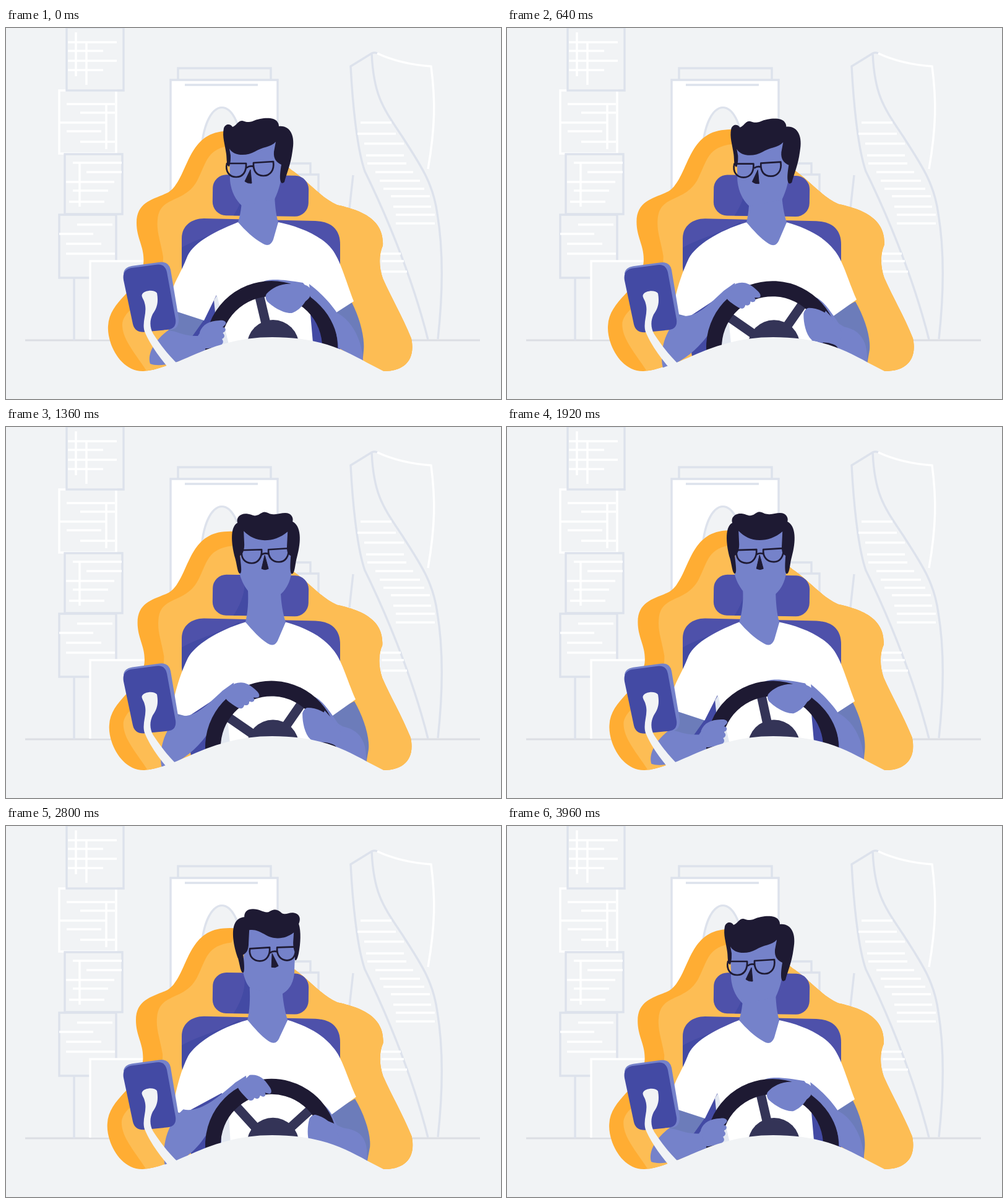
These frames come from a looping animation (800x600 px, 4 s). An HTML page:

```html
<!DOCTYPE html>
<html lang="en">
<head>
<meta charset="utf-8">
<title>Driver</title>
<style>
html, body { margin: 0; width: 100%; height: 100%; overflow: hidden; background: #f1f3f5; }
svg { display: block; width: 800px; height: 600px; }
.line { fill: none; stroke: #dde2ec; stroke-width: 3.4; }
.white { fill: none; stroke: #fff; stroke-width: 3.4; }
.skin { fill: #7582ca; }
.shade { fill: #6c7cba; }
.ink { fill: #1e1a33; }
.navy { fill: #434aa4; }
.violet { fill: #4e51aa; }
.paper { fill: #f1f3f5; }
</style>
</head>
<body>
<svg viewBox="0 0 800 600">
  <defs>
    <clipPath id="blobClip"><use href="#blob"/></clipPath>
    <clipPath id="restClip"><rect x="334" y="238" width="155" height="66" rx="22"/></clipPath>
  </defs>

  <g id="city">
    <path class="line" d="M31 505H766" style="stroke:#dcdee3;stroke-width:3"/>
    <path class="white" d="M86 101H178V203H86Z"/>
    <path class="line" d="M98 -1H190V101H98ZM95 204H188V301H95ZM86 302H178V404H86ZM110 404V505"/>
    <path class="white" d="M136 504V377H240V504" style="fill:#f1f3f5"/>
    <path class="line" d="M278 84V65H428V84M439 219H492V237H505V300M492 237H470"/>
    <path class="line" d="M266 84H439V500H266Z" style="fill:#fff"/>
    <path class="line" d="M289 92H407"/>
    <path class="line" d="M316 195C323 108 374 105 382 195" style="fill:#f1f3f5"/>
    <path class="line" d="M600 41C596 39 593 40 591 41L557 62C560 120 567 195 580 232C606 285 654 392 682 504M591 41C594 110 610 130 640 175C670 222 690 250 697 300C707 360 706 430 698 503M561 238L555 292"/>
    <path class="white" d="M600 41C630 55 660 60 687 62C694 115 694 160 682 228"/>
  </g>

  <g id="cushion">
    <path id="blob" fill="#ffad33" d="M222 555C185 556 163 510 165 482C167 440 215 425 222 382C225 355 211 342 211 315C211 280 240 277 262 266C295 245 290 172 352 167C410 160 440 215 465 232C490 250 510 275 535 286C565 293 612 305 609 352C603 365 602 385 609 405C622 435 640 465 655 502C663 540 640 555 612 555C595 554 585 540 570 535L275 540C255 548 240 554 222 555Z"/>
    <path clip-path="url(#blobClip)" fill="#fdbd54" d="M228 556C212 530 188 505 188 480C190 445 255 440 254 370C250 345 243 330 245 310C248 270 290 285 310 245C325 215 325 195 365 190L400 100H700V600H228Z"/>
  </g>

  <g id="car">
    <path class="violet" d="M284 385V340C284 320 300 308 320 308L500 312C525 313 540 325 540 350V520L500 540H300Z"/>
    <path class="navy" d="M284 355C310 340 350 330 376 314L520 440V540H300L284 385Z"/>
    <g transform="rotate(.8 411 271)">
      <rect class="violet" x="334" y="238" width="155" height="66" rx="22"/>
      <path class="navy" clip-path="url(#restClip)" d="M384 238C389 262 380 285 368 304H430V238Z"/>
    </g>
    <path id="upperL" class="shade"/>
    <path id="upperR" class="shade"/>
    <path id="shirt" fill="#fff"/>
    <path id="fold" fill="#e3e8f1"/>
    <path id="neck" class="skin"/>
    <g id="head">
      <path id="face" class="skin"/>
      <path id="hair" class="ink"/>
      <path id="glasses" fill="none" stroke="#1e1a33" stroke-width="2.7" stroke-linejoin="round"/>
      <path id="nose" class="ink" stroke="#1e1a33" stroke-linejoin="round"/>
    </g>
    <path id="armL" class="skin"/>
    <g class="turn">
      <path class="skin" d="M414 411C425 404 450 407 480 412L490 425L440 425Z"/>
      <path d="M409 431L429 516L344 536" fill="none" stroke="#343457" stroke-width="15"/>
      <circle cx="429" cy="516" r="94.5" fill="none" stroke="#1e1a33" stroke-width="25"/>
    </g>
    <circle cx="431.500" cy="514" r="42" fill="#343457"/>
    <path id="armR" class="skin"/>
    <g class="turn skin">
      <path d="M313 492C318 479 328 474 345 473C353 472 358 476 354 480L350 484C356 484 356 490 352 492L350 493C355 497 353 501 349 503C353 508 350 512 345 514C330 518 325 519 320 518Z"/>
      <path d="M421 430C430 420 445 412 465 414C478 413 488 415 492 422C496 430 490 438 484 442C478 452 470 458 462 461C448 462 430 450 422 442C419 437 419 433 421 430Z"/>
    </g>
  </g>

  <g id="phone">
    <path class="skin" d="M190 396Q191 386 204 384L248 378Q263 376 266 390L279 468Q280 485 268 487L250 485L200 410Z"/>
    <path class="navy" d="M205 387L243 382Q257 380 260 394L274 470Q276 485 262 487L222 491Q208 491 205 478L190 407Q187 389 205 387Z"/>
    <path class="paper" d="M220 430C224 423 240 422 244 428C247 445 243 453 237 462C232 472 232 484 238 494C250 512 262 528 280 545L262 548C248 532 232 510 224 490C219 474 229 460 224 444C223 438 218 434 220 430Z"/>
  </g>
  <path class="paper" d="M235 554C262 547 275 541 300 530C345 510 385 500 430 500C505 500 545 520 583 541L612 556V600H235Z"/>
</svg>

<script>
const LOOP = 4000, TURN = 67.3, MID = 0.713;
const $ = id => document.getElementById(id);

// Window bars: "y from to" and, for uprights, "x from to"
const across = '23 100 179,37 100 157,53 100 179,68 100 157,123 98 176,137 120 176,153 86 163,167 98 154,184 120 176,' +
  '218 108 187,233 130 187,249 97 175,263 108 165,281 102 159,318 115 172,333 86 141,349 97 154,365 97 176';
const tower = '153 573 623,171 568 630,187 579 643,206 582 643,219 584 647,233 597 658,247 604 669,260 610 676,' +
  '272 622 685,289 626 687,302 630 693,316 630 693,365 605 638,377 607 643,394 608 648';
const upright = '113 7 78,130 24 92,162 123 196,119 219 289';
const bars = (list, draw) => list.split(',').map(s => draw(...s.split(' '))).join('');
$('city').insertAdjacentHTML('beforeend', `<path class="white" d="${
  bars(across + ',' + tower, (y, a, b) => `M${a} ${y}H${b}`) + bars(upright, (x, a, b) => `M${x} ${a}V${b}`)}"/>`);

// Steering poses: left turn and straight, with an optional bend pose between
const steer = {
  upperL: ['M275 455L320 472L300 500L262 490Z', 'M276 460L300 467L290 490L268 488Z'],
  upperR: ['M530 455L559 444C572 470 580 500 578 522L576 542L535 500Z',
           'M524 462L563 442C578 468 588 500 586 520L582 543L533 500Z'],
  shirt: ['M375 314C330 332 300 350 292 372C283 395 275 405 268 425L277 459L320 473L340 432L347 520L497 520L490 440L534 460L562 442C548 405 540 375 527 358C510 335 470 320 440 314L424 345Z',
          'M387 314C340 328 305 352 294 372C283 395 277 415 272 435L275 462L294 467L347 432L350 520L503 520L497 445L527 466L565 439C550 405 543 375 528 358C510 335 480 322 452 314L430 345Z'],
  fold: ['M341 432L336 440L344 520L362 520L350 470Z', 'M345 450L345 460L347 520L363 520L358 470Z'],
  neck: ['M375 314C380 298 382 280 381 262L434 262C434 282 436 302 440 314L432 342C428 352 422 353 414 348C400 340 386 327 375 314Z',
         'M387 314C391 298 392 280 391 262L444 262C444 282 448 302 452 314L440 342C436 352 430 353 422 348C410 340 398 327 387 314Z'],
  armL: ['M262 489C277 490 288 499 310 498L322 480L345 513C330 516 305 528 290 535C270 544 245 548 233 543C229 532 234 510 262 489Z',
         'M271 477C291 480 296 465 316 447L334 431L346 470C340 489 317 507 304 520C284 533 260 545 242 546C238 531 242 501 271 477Z',
         'M281 465C305 470 325 448 350 425L368 412L374 445C350 462 335 485 318 505C300 526 280 542 252 550C247 530 250 492 281 465Z'],
  armR: ['M490 414C505 425 525 445 535 461C555 470 576 500 577 540L537 517C536 490 525 460 492 435Z',
         'M516 426C515 447 529 461 540 472C562 479 580 502 580 541L536 517C534 501 525 484 505 462Z',
         'M515 457C525 468 533 477 545 483C570 488 584 505 582 542L535 518C533 512 525 508 492 506Z']
};

// Head poses: left, front, right
const look = {
  face: ['M361 190L362 246C364 268 374 281 382 288L434 277C441 262 444 250 446 236C449 224 446 217 436 214L437 180Z',
         'M371 165L367 236C371 252 378 262 385 270L434 270C443 262 449 250 451 236C453 224 454 212 450 206L446 165Z',
         'M372 165L369 236C372 250 376 258 382 263L431 272C446 264 451 250 452 236C452 224 453 212 453 206L451 165Z'],
  hair: ['M360 224C356 222 357 212 356 204C354 188 349 176 352 162C355 154 363 155 366 160C373 158 374 150 382 150C388 152 391 153 398 151C411 145 425 145 432 147C438 149 441 154 441 159C459 157 468 174 463 199C460 222 453 236 450 249C445 254 440 250 445 221C437 217 432 212 433 200L436 184C428 193 414 192 402 200C390 207 368 208 361 195L363 206C363 212 363 216 362 219C362 221 361 225 360 224Z',
         'M368 237C364 237 363 222 360 212C355 195 350 162 364 155C361 146 369 139 379 140C391 142 389 145 398 142C406 136 408 136 416 140C426 143 433 139 441 139C451 139 455 147 453 153C467 160 467 185 460 210C457 220 457 234 453 237C448 240 449 222 450 208C446 206 443 203 444 190L445 169C433 179 421 183 408 183C394 183 383 177 374 168L375 190C375 202 371 206 368 208C369 220 372 237 368 237Z',
         'M369 237C365 237 364 225 361 214C354 196 343 149 371 147C371 138 376 134 385 134C396 134 401 140 410 139C420 133 424 134 432 141C438 144 444 139 450 140C460 141 463 149 459 158C463 170 462 190 459 205C458 210 456 217 454 217C452 217 453 211 453 204C451 200 450 196 450 188L451 172C442 179 432 182 422 181C405 180 396 165 379 168L378 188C378 200 375 205 369 208C371 220 372 237 369 237Z'],
  glasses: ['M357 219L388 219C389 232 383 241 372 241C361 241 354 232 357 219ZM400 218L432 216C434 230 427 239 416 239C405 239 399 231 400 218ZM389 226Q394 222 400 224',
            'M371 199L403 198C404 211 397 220 387 220C376 220 369 212 371 199ZM414 198L446 196C448 209 441 218 431 218C420 218 413 210 414 198ZM403 206Q408 203 414 205',
            'M380 198L412 196C413 209 407 218 396 218C386 218 378 211 380 198ZM424 196L454 195C455 209 450 217 440 217C430 217 423 209 424 196ZM412 205Q418 201 424 203'],
  nose: ['M395 229L386 248Q391 252 397 251Z', 'M408 207L403 229Q409 232 414 229Z', 'M416 206L415 228Q421 230 426 226Z']
};

const NUM = /-?[\d.]+/g;
const tables = new Map();
for (const poses of [...Object.values(steer), ...Object.values(look)])
  tables.set(poses, poses.map(p => p.match(NUM).map(Number)));

function blend(poses, weights) {
  const table = tables.get(poses);
  let i = 0;
  return poses[0].replace(NUM, () => {
    const v = table.reduce((sum, row, k) => sum + row[i] * weights[k], 0);
    i++;
    return v.toFixed(2);
  });
}

const ease = k => (1 - Math.cos(Math.PI * k)) / 2;

function track(keys, t) {
  const i = keys.findIndex(k => k[0] > t);
  const [t0, a] = keys[i - 1], [t1, b] = keys[i];
  return a + (b - a) * ease((t - t0) / (t1 - t0));
}

const yawKeys = [[0, -1], [850, -1], [1400, 0], [2030, 0], [2650, 1], [3430, 1], [3950, -1], [LOOP, -1]];
const nodKeys = [[0, 0], [700, 0.5], [1360, -1.5], [1650, -4], [1920, -1.5], [2300, -1.5], [2800, 0.5], [3440, 4], [3950, 0], [LOOP, 0]];
const bobKeys = [[0, 0], [640, 0.5], [1500, 4], [1920, 3.9], [2800, -0.5], [3440, 1], [LOOP, 0]];

function draw(t) {
  const swing = ease(t / 1000);
  const u = swing / MID;
  const yaw = track(yawKeys, t), bob = track(bobKeys, t);
  const line = [1 - u, u];
  const bend = [(1 - u) ** 2, 2 * u * (1 - u), u * u];
  const facing = [Math.max(-yaw, 0), 1 - Math.abs(yaw), Math.max(yaw, 0)];

  for (const id in steer) $(id).setAttribute('d', blend(steer[id], steer[id].length > 2 ? bend : line));
  for (const id in look) $(id).setAttribute('d', blend(look[id], facing));
  for (const g of document.querySelectorAll('.turn')) g.setAttribute('transform', `rotate(${swing * TURN} 429 516)`);

  $('head').setAttribute('transform', `translate(${swing * 14.5 + facing[2]} ${track(nodKeys, t)})`);
  $('car').setAttribute('transform', `translate(0 ${bob * 0.4})`);
  $('phone').setAttribute('transform', `translate(0 ${bob + 0.8})`);
  const swell = 1 + 0.0065 * Math.sin(Math.PI * t / 1000);
  $('cushion').setAttribute('transform', `translate(480 555) scale(${swell}) translate(-480 -555)`);
}

const start = performance.now();
function tick() {
  draw((performance.now() - start) % LOOP);
  requestAnimationFrame(tick);
}
tick();
</script>
</body>
</html>
```
